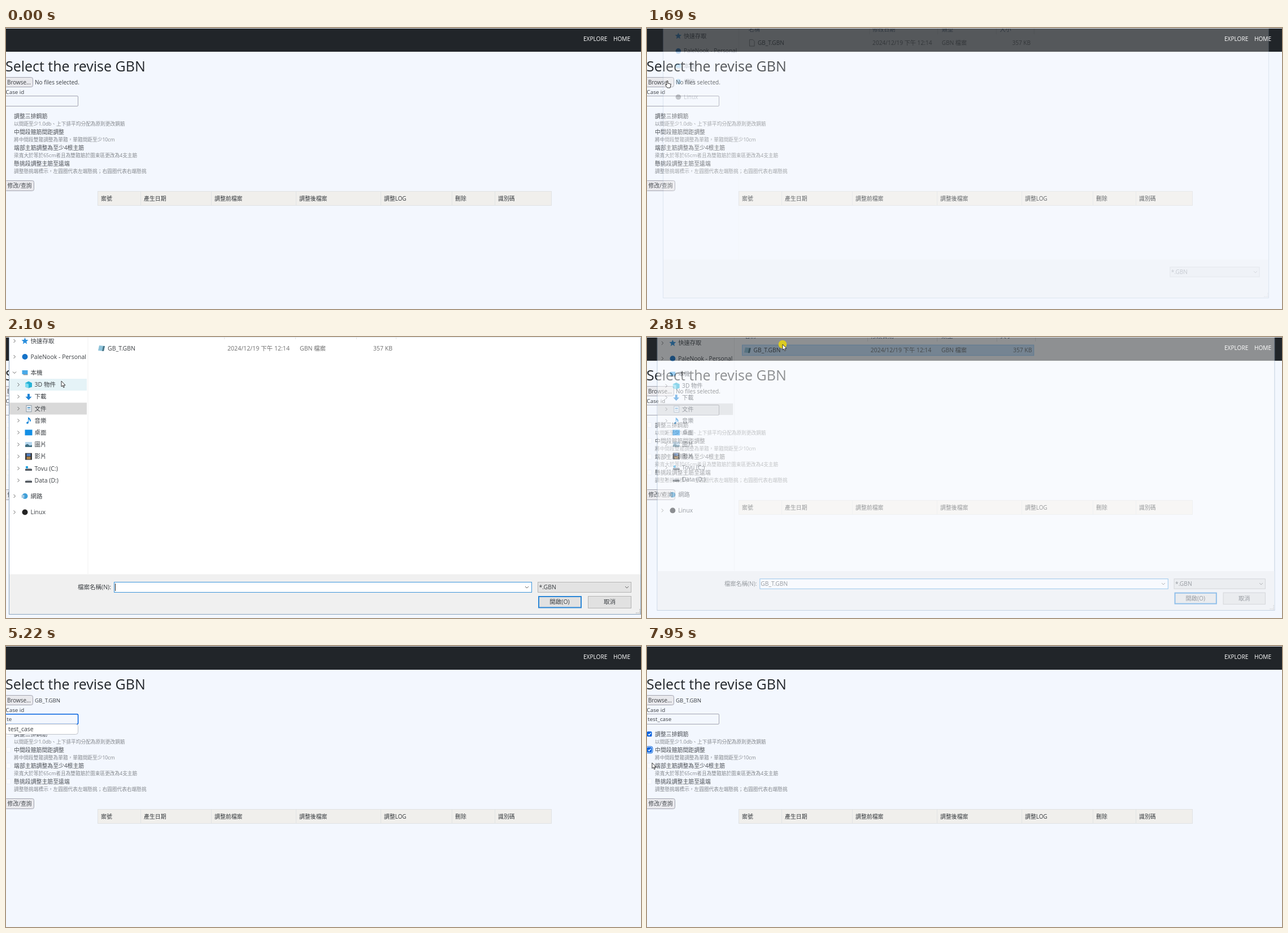
These frames come from a looping animation (1124 by 498 pixels, 7.99 s). An HTML page:

```html
<!DOCTYPE html>
<html lang="zh-Hant">
<head>
<meta charset="utf-8">
<title>Select the revise GBN</title>
<style>
  html, body { margin: 0; width: 100%; height: 100%; overflow: hidden; background: #f3f7fe; }
  svg { display: block; }
  text { font-family: "Open Sans", "Noto Sans CJK TC", "Noto Sans CJK JP", "Noto Sans CJK", sans-serif; white-space: pre; }
</style>
</head>
<body>
<svg id="stage" width="1124" height="498" viewBox="0 0 1124 498"></svg>
<script>
const LOOP = 7990;
const INK = '#3a3e42', EDGE = '#a3a4b0', BLUE = '#0060df';

const text = (x, cy, size, str, fill = INK, extra = '') =>
  `<text x="${x}" y="${cy + size * .36}" font-size="${size}" fill="${fill}" ${extra}>${str}</text>`;
const rect = (x, y, w, h, fill, extra = '') =>
  `<rect x="${x}" y="${y}" width="${w}" height="${h}" fill="${fill}" ${extra}/>`;
const box = (x, y, w, h, fill, stroke, extra = '') =>
  rect(x + .5, y + .5, w - 1, h - 1, fill, `stroke="${stroke}" ${extra}`);
const path = (d, fill, extra = '') => `<path d="${d}" fill="${fill}" ${extra}/>`;
const dot = (r, fill) => `<circle r="${r}" fill="${fill}"/>`;
const group = (id, content, extra = '') => `<g id="${id}" ${extra}>${content}</g>`;
const at = (x, y, content) => `<g transform="translate(${x} ${y})">${content}</g>`;
const chevron = (x, y, turn = 0) =>
  `<path d="M-1.5 -3L1.5 0L-1.5 3" fill="none" stroke="#666" transform="translate(${x} ${y}) rotate(${turn})"/>`;

// Web page
const options = [
  ['調整三排鋼筋', '以間距至少1.0db、上下排平均分配為原則更改鋼筋'],
  ['中間段箍筋間距調整', '將中間段雙箍調整為單箍，單箍間距至少10cm'],
  ['端部主筋調整為至少4根主筋', '梁寬大於等於65cm者且為雙箍筋於圍束區更改為4支主筋'],
  ['懸挑段調整主筋至遠端', '調整懸挑端標示，左圓圈代表左端懸挑；右圓圈代表右端懸挑']
];
const columns = [[162, '案號'], [238, '產生日期'], [363, '調整前檔案'], [513, '調整後檔案'],
  [663, '調整LOG'], [789, '刪除'], [865, '識別碼']];
const optionY = i => 156 + i * 28;

const checkedBox = i => group('check' + i,
  group('ring' + i, rect(-1.5, optionY(i) - 6, 11.5, 12, 'none', `stroke="${BLUE}" rx="3"`)) +
  rect(0, optionY(i) - 4.5, 8.5, 9, BLUE, 'rx="1.5"') +
  path(`M2 ${optionY(i)}l1.8 2l3 -4`, 'none', 'stroke="#fff" stroke-width="1.3"'));

const page =
  rect(0, 0, 1124, 498, '#f3f7fe') +
  rect(0, 42, 1124, 1, '#dfe3ea') + rect(0, 0, 1124, 42, '#212529') +
  text(1022, 19, 10.1, 'EXPLORE', '#fff') + text(1075, 19, 10.1, 'HOME', '#fff') +
  text(-1, 67.5, 25, 'Select the revise GBN', '#212529') +
  box(-3, 87, 51, 18, '#e9e9ed', EDGE, 'rx="3"') + text(2, 96.5, 9.9, 'Browse...') +
  group('noFile', text(51, 96.5, 10, 'No files selected.')) +
  group('hasFile', text(51, 96.5, 9.7, 'GB_T.GBN')) +
  text(-.5, 113, 9.8, 'Case id') +
  box(-3, 120, 131, 19, '#f3f7fe', EDGE, 'rx="1.5"') +
  group('focus', rect(-2, 120.7, 129.6, 17.8, '#f3f7fe', `stroke="${BLUE}" stroke-width="1.5" rx="2"`)) +
  `<text id="caseId" x="1.3" y="133" font-size="9.85" fill="${INK}"></text>` +
  '<rect id="caret" y="124" width="1" height="11" fill="#222"/>' +
  group('unchecked', options.map((option, i) =>
    rect(.5, optionY(i) - 4.5, 8, 9, '#f9fbff', 'stroke="#ebeff6" rx="2"')).join('')) +
  options.map(([title, note], i) =>
    text(14, optionY(i), 9.9, title, '#4a4e53') +
    text(14, optionY(i) + 13.8, 8.7, note, '#84888d')).join('') +
  checkedBox(0) + checkedBox(1) +
  box(-3, 270, 53, 19, '#e9e9ed', EDGE, 'rx="3"') + text(2.5, 279.5, 9.9, '修改/查詢', '#4a4e53') +
  box(162, 289, 804, 26, '#f0efec', '#e1e3e4') +
  columns.map(([x, label], i) => (i ? rect(x, 289, 1, 25, '#e1e3e4') : '') +
    text(x + 6, 302, 9.9, label, '#33373b')).join('') +
  group('suggest', box(-2, 138, 130, 19, '#fff', '#bfc2c8', 'rx="4"') +
    group('picked', rect(0, 140, 126, 15.5, '#dfe0e6', 'rx="2"')) +
    text(4, 147.5, 10.5, 'test_case'));

// File dialog
const drive = path('M-6 1L-3 -1H4L6 1V4H-6Z', '#c9ced3') + rect(-6, 1, 12, 3, '#4c5258');
const frame = fill => rect(-6, -4.5, 12, 9, fill);
const icons = {
  star: path('M0 -6L1.7 -2L6 -1.7L2.7 1.2L3.7 5.5L0 3.1L-3.7 5.5L-2.7 1.2L-6 -1.7L-1.7 -2Z', '#2b8fdd'),
  cloud: dot(5, '#1673c8'),
  pc: rect(-5, -4, 10, 7, '#49a9e8') + rect(-3, 3, 8, 1.5, '#8d979f'),
  cube: path('M-6 -3L0 -6L6 -3V4L0 6L-6 4Z', '#25b2d6') + path('M-6 -3L0 -1V6L-6 4Z', '#7fdcf0'),
  down: path('M-2 -5H2V0H5.5L0 6L-5.5 0H-2Z', '#1f84d6'),
  doc: box(-4.5, -6, 10, 12, '#eef3f7', '#8b98a3') + rect(-2, -2.5, 5, 2, '#4c93c6') + rect(-2, 1.5, 5, 1, '#8b98a3'),
  note: path('M-1 -6Q4 -4 4 1L2 2Q2 -2 0 -2V4Q-1 7 -4 5Q-4 2 -1 2Z', '#1787d8'),
  desk: rect(-6.5, -5, 13, 10, '#138fe5'),
  pic: frame('#b7d8ef') + path('M-6 4.5V1L-2 -1L2 2L6 1V4.5Z', '#406f83'),
  film: rect(-6, -6, 12, 12, '#35383c') + rect(-3.5, -5, 7, 4.5, '#517fc2') + rect(-3.5, .5, 7, 4.5, '#b08144'),
  system: drive + rect(-5, -4, 4, 4, '#26a5e2'),
  drive,
  net: dot(5, '#3f9fd8') + rect(-6, -2, 5, 5, '#a6cbe4'),
  linux: dot(5, '#232323'),
  blank: path('M-4 -6H2L5 -3V6H-4Z', '#fff', 'stroke="#8a8a8a"'),
  notepad: path('M-4 -5L6 -4L4 5L-6 4Z', '#8fc3da') + path('M3 -4L6 -4L4 5L1 5Z', '#4a7688')
};
const children = [['cube', '3D 物件'], ['down', '下載'], ['doc', '文件'], ['note', '音樂'], ['desk', '桌面'],
  ['pic', '圖片'], ['film', '影片'], ['system', 'Tovu (C:)'], ['drive', 'Data (D:)']];
const childY = i => 84.5 + i * 21.2;
const roots = open => [['star', '快速存取', 7], ['cloud', 'PaleNook - Personal', 35], ['pc', '本機', 63],
  ['net', '網路', open ? 282 : 91.5], ['linux', 'Linux', open ? 310.5 : 120]];
const rowCentres = [...roots(true).map(r => r[2]), ...children.map((c, i) => childY(i))];

const rootRows = open => roots(open).map(([icon, label, y]) =>
  (open ? chevron(15, y, icon === 'pc' ? 90 : 0) : '') +
  at(33.5, y, icons[icon]) + text(43.5, y, 10.5, label)).join('');
const tree = rect(6, childY(2) - 10.5, 137, 21, '#d9d9d9') +
  '<rect id="hover" x="6" width="137" height="21" fill="#e5f3f7"/>' + rootRows(true) +
  children.map(([icon, label], i) => chevron(22, childY(i)) +
    at(40, childY(i), icons[icon]) + text(50.5, childY(i), 10.5, label)).join('');

const GREY = '#6d6d6d';
const dialog =
  '<clipPath id="side"><rect x="5" y="-40" width="138" height="460"/></clipPath>' +
  box(5, -60, 1119, 552, '#fff', '#8ca4bd') +
  rect(6, 420.5, 1117, 70.5, '#f0f0f0') + rect(144.5, -40, 1, 460, '#f1f1f1') +
  group('collapsed', rootRows(false) + at(169, 20, icons.blank), 'clip-path="url(#side)"') +
  group('expanded', tree, 'clip-path="url(#side)"') +
  [[163, '名稱'], [392, '修改日期'], [520, '類型'], [627, '大小']]
    .map(([x, label]) => text(x, -5.5, 10.5, label, '#4c607a')).join('') +
  [386, 512, 620, 690].map(x => rect(x, -20, 1, 24, '#e5e5e5')).join('') +
  '<rect id="fileRow" x="159.5" y="10.5" width="528" height="19"/>' +
  group('blankIcon', at(169, 20, icons.blank)) + group('fileIcon', at(169, 20, icons.notepad)) +
  text(180, 20, 10.5, 'GB_T.GBN') + text(392, 20, 10.6, '2024/12/19 下午 12:14', GREY) +
  text(520, 20, 10.5, 'GBN 檔案', GREY) + text(684, 20, 10.5, '357 KB', GREY, 'text-anchor="end"') +
  box(941, 434, 166, 19, '#e3e3e3', '#b5b5b5') + text(943.5, 443.5, 10.5, '*.GBN') + chevron(1099, 443.5, 90) +
  group('controls',
    text(186, 443.5, 10.5, '檔案名稱(N):', INK, 'text-anchor="end"') +
    box(191, 434, 740, 19, '#fff', '#3c94da') + chevron(922, 443.5, 90) +
    group('emptyName', rect(193, 437, 1, 13, '#222')) +
    group('fileName', text(193, 443.5, 10.5, 'GB_T.GBN')) +
    rect(943, 460, 75, 19.5, '#e1e1e1', 'stroke="#2b86d6" stroke-width="2"') +
    text(980, 469.5, 10.5, '開啟(O)', INK, 'text-anchor="middle"') +
    box(1030, 459, 77, 22, '#e1e1e1', '#b5b5b5') +
    text(1068.5, 469.5, 10.5, '取消', INK, 'text-anchor="middle"')) +
  [0, 3, 6].map(k => path(`M${1115 + k} 489h1.5M1121 ${489 - k}h1.5`, 'none', 'stroke="#b0b0b0" stroke-width="1.5"')).join('');

const outline = 'stroke="#222" stroke-width=".9" stroke-linejoin="round"';
const pointer =
  group('press', dot(7.3, '#dccb22')) +
  group('arrow', path('M0 0V10L2.3 8L3.8 11.6L5.4 10.9L3.9 7.4H7Z', '#fff', outline)) +
  group('hand', path('M-1 0Q0 -1 1 0V4L5 5Q6 5.4 6 7L5 12H0L-3.6 7.4Q-3.6 6 -1 7Z', '#fff', outline)) +
  group('beam', path('M-2 -5.5H2M0 -5.5V5.5M-2 5.5H2', 'none', 'stroke="#222"'));

document.getElementById('stage').innerHTML =
  page + group('dialog', dialog) + rect(0, 0, 1124, 1, '#e6eaf1') + group('pointer', pointer);

// Timeline
const route = [[100, 1068, 500], [800, 30, 70], [890, 36, 90], [1290, 36, 94], [1800, 36, 94], [2100, 98, 78],
  [2600, 240, 13], [2870, 240, 13], [3080, 120, 141], [3210, 97, 143], [3420, 92, 129], [6300, 92, 129],
  [6650, 45, 22], [7020, 4, 157], [7220, 4, 157], [7470, 4, 183], [7750, 4, 183], [7950, 9, 207]];
const clicks = [[1150, 1290], [2580, 2670], [2740, 2850], [3430, 3570], [7130, 7240], [7620, 7740]];
const caretOn = [[3440, 4070], [4510, 5220], [5700, 6430], [6930, 7130]];

const within = (t, a, b) => t >= a && t < b;
const during = (t, spans) => spans.some(([a, b]) => within(t, a, b));
const clamp = v => Math.min(1, Math.max(0, v));
const node = id => document.getElementById(id);
const show = (id, on) => node(id).setAttribute('visibility', on ? 'inherit' : 'hidden');
const set = (id, attrs) => { for (const k in attrs) node(id).setAttribute(k, attrs[k]); };

function pointerAt(t) {
  const next = route.findIndex(p => p[0] > t);
  if (next <= 0) return (next ? route[route.length - 1] : route[0]).slice(1);
  const [t0, x0, y0] = route[next - 1], [t1, x1, y1] = route[next];
  const p = (t - t0) / (t1 - t0), e = p * p * (3 - 2 * p);
  return [x0 + (x1 - x0) * e, y0 + (y1 - y0) * e];
}

function drawPage(t) {
  const typed = t < 4510 ? '' : t < 4750 ? 't' : t < 5930 ? 'te' : 'test_case';
  const caretX = { '': 1, t: 5, te: 10, test_case: 43.5 }[typed];
  show('noFile', t < 2830);
  show('hasFile', t >= 2830);
  show('focus', within(t, 3440, 7130));
  node('caseId').textContent = typed;
  set('caret', { x: caretX });
  show('caret', during(t, caretOn));
  show('suggest', within(t, 4540, 5930));
  show('picked', within(t, 5570, 5930));
  show('unchecked', t >= 1900);
  show('check0', t >= 7200);
  show('ring0', within(t, 7200, 7620));
  show('check1', t >= 7690);
  show('ring1', t >= 7690);
}

function drawDialog(t, x, y) {
  const opening = clamp((t - 1640) / 220), closing = clamp((t - 2760) / 100);
  const scale = 1 - .07 * (1 - opening) ** 2 - .044 * closing;
  const ready = t >= 1760, open = t >= 1900, chosen = t >= 2600;
  const row = rowCentres.find(c => Math.abs(c - y) < 10.6);
  const onRow = open && x < 143 && row !== undefined;
  set('dialog', {
    opacity: opening * (1 - closing),
    transform: `translate(564.5 175) scale(${scale}) translate(-564.5 -175)`
  });
  show('dialog', within(t, 1640, 2860));
  show('controls', ready);
  show('blankIcon', !ready);
  show('fileIcon', ready);
  show('collapsed', !open);
  show('expanded', open);
  show('hover', onRow);
  if (onRow) set('hover', { y: row - 10.5 });
  show('fileRow', chosen || (x > 159 && within(y, 10, 30)));
  set('fileRow', chosen ? { fill: '#cce8ff', stroke: '#99d1ff' } : { fill: '#e5f3ff', stroke: 'none' });
  show('emptyName', open && !chosen);
  show('fileName', chosen);
}

function drawPointer(t, x, y) {
  const onPage = !within(t, 1780, 2860);
  const hand = onPage && x < 48 && within(y, 87, 105);
  const beam = onPage && x < 128 && within(y, 120, 139);
  set('pointer', { transform: `translate(${x} ${y})` });
  show('pointer', t >= 100 && !within(t, 4510, 6300));
  show('press', during(t, clicks));
  show('hand', hand);
  show('beam', beam);
  show('arrow', !hand && !beam);
}

const start = performance.now();
function tick() {
  const t = (performance.now() - start) % LOOP;
  const [x, y] = pointerAt(t);
  drawPage(t);
  drawDialog(t, x, y);
  drawPointer(t, x, y);
  requestAnimationFrame(tick);
}
tick();
</script>
</body>
</html>
```
